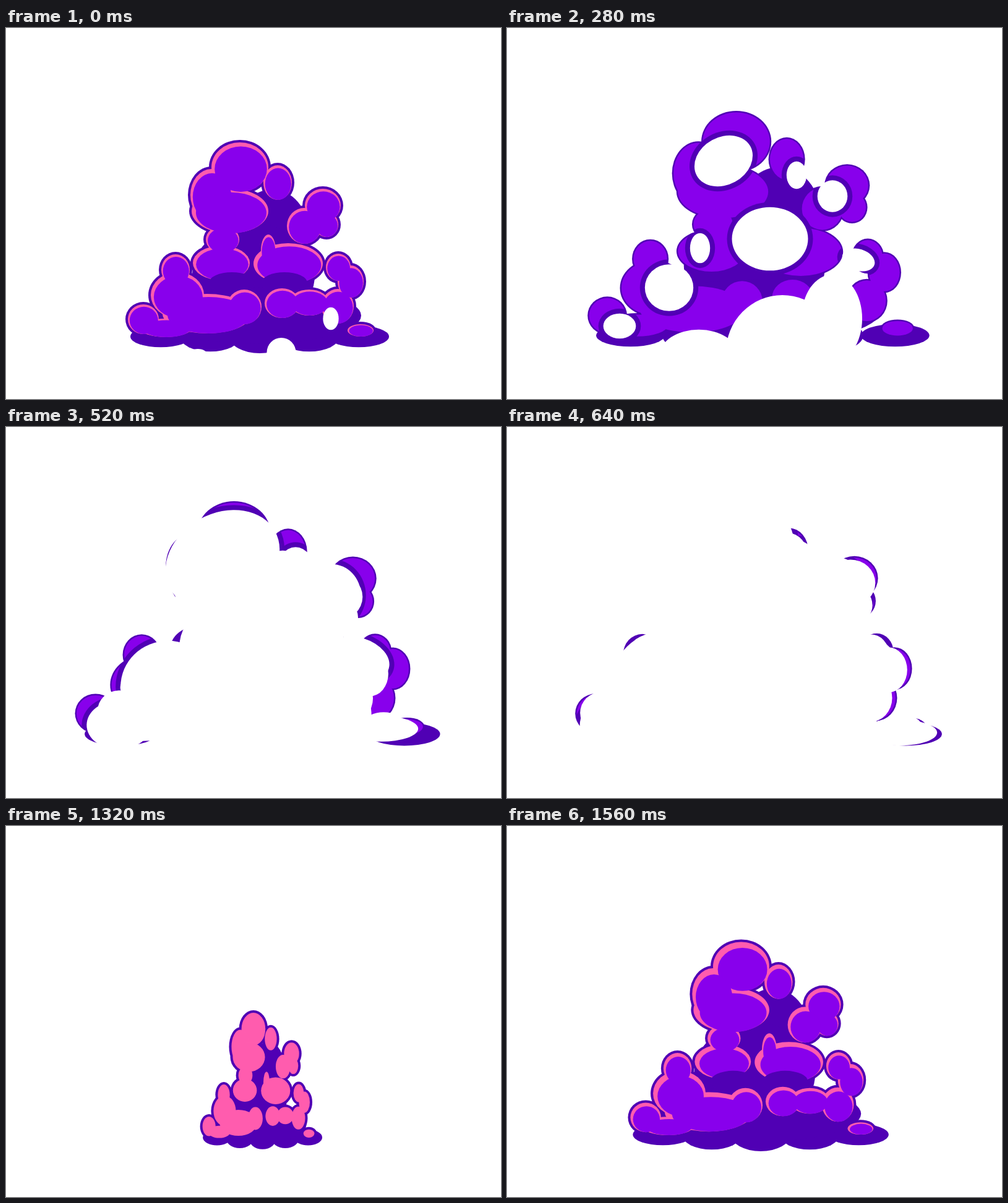
Write an HTML page with a canvas that moves like this. It is 800x600 px and loops after 1600 ms.

```html
<!DOCTYPE html>
<html>
<head>
<meta charset="utf-8">
<style>
  html, body { margin: 0; width: 100%; height: 100%; overflow: hidden; background: #fff; }
  canvas { display: block; width: 100vw; height: 100vh; }
</style>
</head>
<body>
<canvas width="800" height="600"></canvas>
<script>
const ctx = document.querySelector('canvas').getContext('2d');
const DARK = '#5000b4', PURPLE = '#8800ec', PINK = '#ff5cae';
const LOOP = 1600, STEP = 40, LEAD = 400;
const GROUND = 512, CENTER = { x: 400, y: 440 };

// All ellipses are [x, y, rx, ry, angle?]; puffs are given in the full-grown pose.
const UPPER = [
  [378,225,46,40], [439,250,23,28], [332,270,34,42], [362,296,62,36], [512,287,29,27],
  [518,318,19,20], [482,320,28,29], [424,360,12,26], [456,381,56,33], [350,342,27,22], [348,380,46,28]];
const LOWER = [
  [274,391,23,25], [277,432,43,37], [325,462,72,32], [385,451,28,28], [222,471,25,24], [258,485,42,15],
  [446,445,28,24], [490,444,32,21], [537,387,20,22], [557,410,21,26], [536,450,26,28], [573,489,21,10]];
const CORE = [[430,330,55,65], [400,400,95,80], [405,465,165,42]];
const FLOOR = Array.from({ length: 5 }, (_, i) =>
  [250 + 80 * i, 499, 45, 9 + 14 * Math.sin((i + .5) / 5 * Math.PI)]);
const SHADES = [365, 450].map(x => [x, 412, 37, 17]);

const HOLES = [
  [350,215,73,57,-.5], [425,341,91,76], [468,238,24,33], [526,272,36,38],
  [312,356,24,36], [262,420,58,56], [182,482,39,30], [568,375,40,26,.3]];
const ARCH = [[445,525,108,110], [525,470,58,84], [310,530,75,50]];

const clamp = v => Math.min(1, Math.max(0, v));
const span = (u, from, to) => clamp((u - from) / (to - from));
const easeOut = (v, power = 2) => 1 - (1 - v) ** power;
const mix = (a, b, k) => a + (b - a) * k;

function fillOval([x, y, rx, ry, angle = 0], color, pad = 0) {
  ctx.beginPath();
  ctx.ellipse(x, y, Math.max(0, rx + pad), Math.max(0, ry + pad), angle, 0, 7);
  ctx.fillStyle = color;
  ctx.fill();
}

const resize = ([x, y, rx, ry, angle], k) => [x, y, rx * k, ry * k, angle];

// Narrow sprout -> full cloud -> wide, rising ring
function placement(u) {
  const birth = mix(.35, 1, easeOut(span(u, 0, 120)));
  const rise = easeOut(span(u, 120, 400));
  const burst = 1.05 * easeOut(span(u, 400, 1040), 2.5);
  const scale = (young, gain) => birth * mix(young, 1, rise) * (1 + gain * burst);
  const sx = scale(.46, .42), sy = scale(.64, .18), wide = scale(.42, .22), tall = scale(.66, .22);
  const originX = mix(410, 400, rise);
  return ([x, y, rx, ry]) =>
    [originX + (x - 400) * sx, GROUND + (y - GROUND) * sy, rx * wide, ry * tall];
}

// Pink caps are covered by purple from below until only rims are left.
function paintLayer(puffs, cover) {
  if (cover < 1) puffs.forEach(puff => fillOval(puff, PINK));
  if (cover > 0) {
    for (const [x, y, rx, ry] of puffs) {
      const rest = 1 - cover;
      fillOval([x + rx * rest * .4, y + ry * rest, rx * cover, ry * cover], PURPLE);
    }
  }
}

function cutHoles(u) {
  const open = Math.max(0, (u - 430) / 370);
  const arch = Math.sqrt(Math.max(0, (u - 380) / 420));
  const holes = HOLES.map(hole => resize(hole, open));
  if (open > .1) holes.forEach(hole => fillOval(hole, DARK, 8));
  ctx.globalCompositeOperation = 'destination-out';
  if (open > .1) holes.forEach(hole => fillOval(hole, DARK));
  if (u >= 400) ARCH.forEach(hole => fillOval(resize(hole, arch), DARK));
}

// Erasing a copy pushed inwards leaves crescents on the outer rim.
function erode(u, body, pad) {
  const gap = 10 * ((1340 - u) / 300) ** 4;
  for (const [x, y, rx, ry] of body) {
    const dx = CENTER.x - x, dy = CENTER.y - y, distance = Math.hypot(dx, dy) || 1;
    fillOval([x + dx / distance * gap, y + dy / distance * gap, rx, ry], DARK, pad + 2);
  }
}

function drawCloud(u) {
  const place = placement(u);
  const [upper, lower, core, floor, shades] = [UPPER, LOWER, CORE, FLOOR, SHADES].map(set => set.map(place));
  const body = [...floor, ...core, ...upper, ...lower];
  const border = mix(4, 2.5, span(u, 400, 680));
  const cover = u < 360 ? .88 * span(u, 120, 340) : mix(.88, 1, span(u, 360, 480));

  ctx.globalCompositeOperation = 'source-over';
  body.forEach(part => fillOval(part, DARK, border));
  ctx.globalCompositeOperation = 'source-atop';
  paintLayer(upper, cover);
  const shade = span(u, 160, 340) * (1 - span(u, 440, 600));
  shades.forEach(part => fillOval(resize(part, shade), DARK));
  paintLayer(lower, cover);
  cutHoles(u);
  if (u > 820) erode(u, body, border);
}

function draw(now) {
  const time = Math.floor(now / STEP) * STEP;
  const u = (time + LEAD) % LOOP;
  ctx.clearRect(0, 0, 800, 600);
  if (u < 1340) drawCloud(u);
}

let start;
function frame(now) {
  start ??= now;
  draw(now - start);
  requestAnimationFrame(frame);
}
draw(0);
requestAnimationFrame(frame);
</script>
</body>
</html>
```
